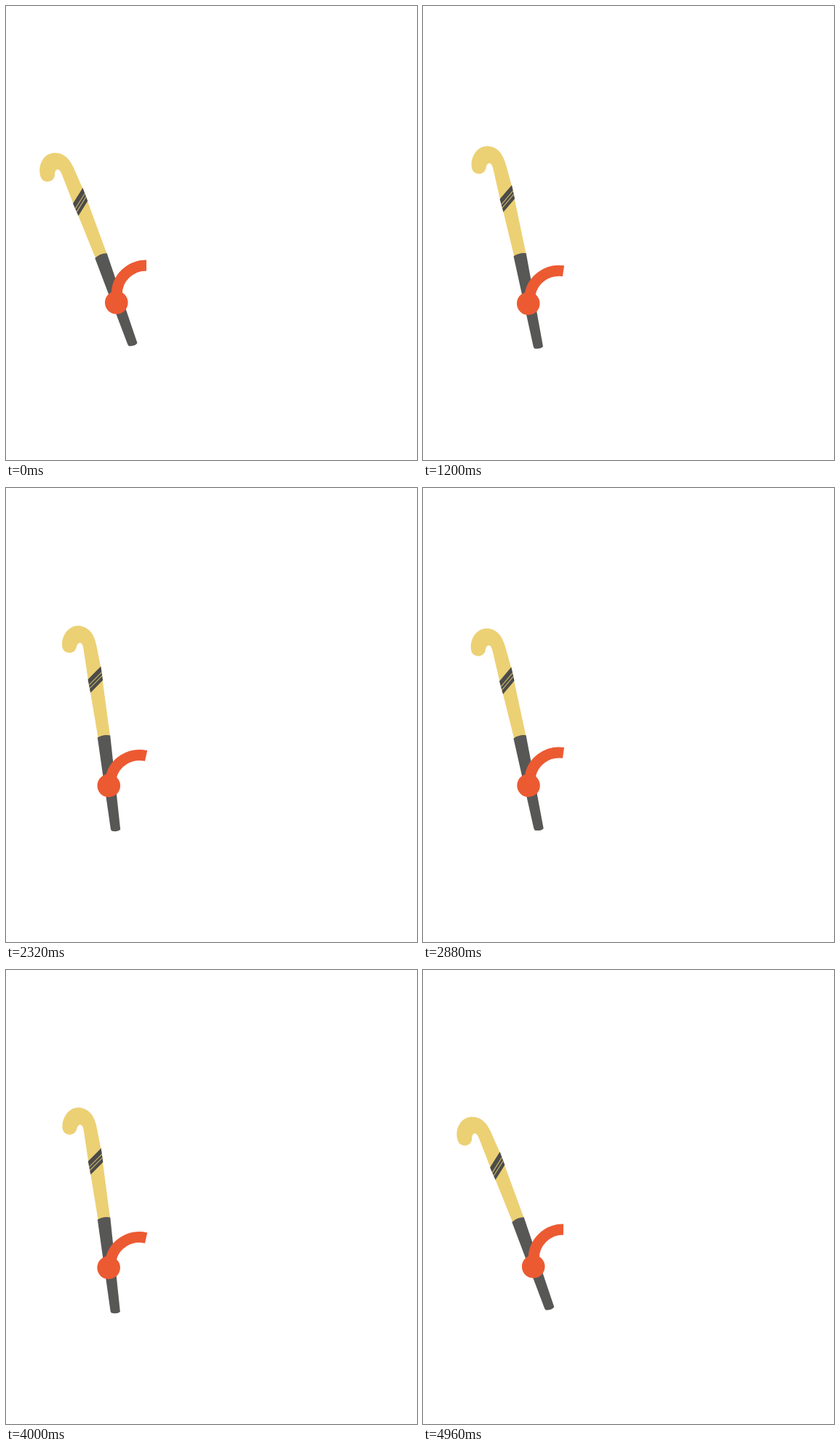
Write an HTML page that moves like this. It is 565 px wide and 623 px high and loops after 5 s.

```html
<!DOCTYPE html>
<html lang="en">
<head>
<meta charset="utf-8">
<title>Hockey stick swing</title>
<style>
  html, body { margin: 0; width: 100%; height: 100%; overflow: hidden; background: #fff; }
  svg { display: block; }
</style>
</head>
<body>
<svg width="565" height="623" viewBox="0 0 565 623">
  <g id="swing">
    <!-- head and shaft -->
    <path fill="#ecd074" d="M47.5 234 C45.5 228 45.7 221 48.5 214.5 C52 206.5 59 201.5 67 201.5
      C74 201.5 80.5 204.3 85.3 209.8 C89.5 214.8 92.2 220 94.7 226 L106.2 252 L139 341 L123.5 347
      L99.5 288 L92 270 L77 231.5 C75.5 227.5 73.5 224.3 71 224.3 C68.5 224.3 67 227.5 67 231.5
      C67 237 62.5 241 57 241 C52.5 241 49 238.5 47.5 234 Z"/>
    <path fill="#4b4b49" d="M105.5 249.5 L92 271 L99.5 288 L112.3 267.5 Z"/>
    <path stroke="#c9b36a" stroke-width="1.2" fill="none" d="M108.4 257.2 L95.2 278.2 M110.1 261.8 L97 282.6"/>
    <!-- grip -->
    <path fill="#575756" d="M122.3 346 Q129 339.5 138.7 339.2 L180.5 462.5 Q177.5 466.8 169 466.8 L167.3 464.5 Z"/>
    <!-- arm and hand -->
    <path fill="none" stroke="#ec5a32" stroke-width="15" d="M152.3 405 V395.5 A40.7 39.6 0 0 1 193 355.9"/>
    <circle cx="151.8" cy="407" r="15.8" fill="#ec5a32"/>
  </g>
</svg>
<script>
  const LOOP = 5000, STEP = 40, SWINGS = 3;
  const REACH = 13.8, PIVOT = '140 360';
  const RISE = 0.88, FALL = 1.03; // the way out starts quicker than the way back
  const swing = document.getElementById('swing');
  const start = performance.now();

  const ease = (p, warp) => (1 - Math.cos(Math.PI * p ** warp)) / 2;

  function angleAt(t) {
    const half = (t / LOOP * SWINGS % 1) * 2;
    return REACH * (half < 1 ? ease(half, RISE) : 1 - ease(half - 1, FALL));
  }

  function draw() {
    const t = Math.max(0, performance.now() - start) % LOOP;
    const angle = angleAt(Math.floor(t / STEP) * STEP);
    swing.setAttribute('transform', `rotate(${angle.toFixed(3)} ${PIVOT})`);
    requestAnimationFrame(draw);
  }
  draw();
</script>
</body>
</html>
```
